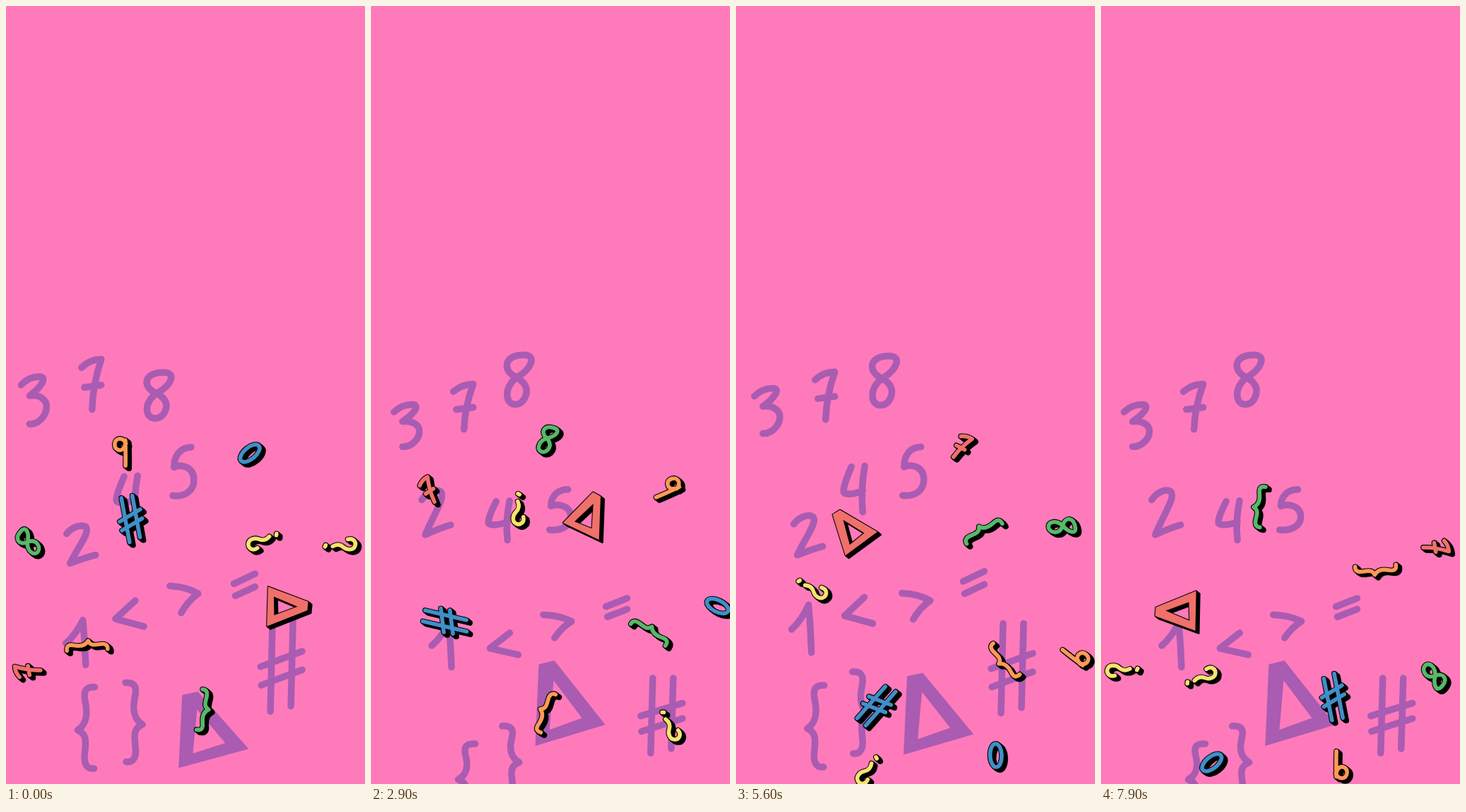
Animation of 508 by 1102 pixels, one loop 8000 ms. Source, as an HTML page with a canvas:

```html
<!DOCTYPE html>
<html>
<head>
<meta charset="utf-8">
<style>
html, body { margin: 0; height: 100%; overflow: hidden; background: #ff7abb; }
canvas { display: block; }
</style>
</head>
<body>
<canvas id="stage" width="508" height="1102"></canvas>
<script>
const ctx = document.getElementById('stage').getContext('2d');
const LOOP = 8000, STEP = 100, SWAY = 5000;
const RAD = Math.PI / 180;

// Centre lines, drawn around the origin
const shapes = {
  '0': 'M4,-30A15,30 8 1 1 -4,30A15,30 8 1 1 4,-30Z',
  '1': 'M-14,1Q0,-11 10,-32Q13,0 14,32',
  '2': 'M-20,-17C-12,-28 0,-32 7,-28C14,-20 -2,0 -15,29Q6,20 21,16',
  '3': 'M-18,-20C-10,-28 0,-31 8,-31C18,-31 14,-20 -6,-6C6,-8 18,-2 18,8C18,22 4,32 -6,31',
  '4': 'M-4,-29C-9,-18 -15,-6 -15,3C-15,8 -2,8 12,2M15,-30Q9,0 12,30',
  '5': 'M12,-32C-4,-32 -12,-20 -12,-6C-2,-10 15,-7 16,9C17,24 4,33 -14,31',
  '7': 'M-14,-22C-6,-29 4,-33 14,-33Q2,0 1,33M-10,4L14,1',
  '8': 'M8,-35C28,-35 18,-16 2,-6C-12,2 -16,14 -15,22C-14,38 8,38 12,18C14,6 4,-1 -4,-5C-22,-14 -20,-35 8,-35Z',
  '9': 'M14,-22C8,-38 -12,-40 -15,-22C-17,-6 0,0 8,-10Q14,-18 13,-30Q12,8 10,36',
  '<': 'M8,-17L-20,7L20,17',
  '>': 'M-20,-17Q4,-16 20,-7Q6,2 -4,18',
  '=': 'M-15,-1L15,-14M-13,15L15,3',
  '#': 'M-12,-59L-15,58M17,-59L14,51M-29,0L30,-20M-28,24L30,4',
  '{': 'M12,-53C-4,-54 -4,-44 -1,-32C2,-18 0,-4 -12,3C0,8 0,16 -2,32C-4,46 0,54 11,53',
  '?': 'M-14,-20C-18,-36 -4,-42 4,-38C16,-33 14,-16 6,-8C-2,0 -4,8 2,20M-2,38l4,2',
  'Δ': 'M-28,-46L-6,-51L66,36L-33,65ZM-7,-24L33,27L-13,43Z'
};

function transformed(path, matrix) {
  const result = new Path2D();
  result.addPath(path, matrix);
  return result;
}

const glyphs = {};
for (const key in shapes) glyphs[key] = new Path2D(shapes[key]);
glyphs['}'] = transformed(glyphs['{'], new DOMMatrix([-1, 0, 0, 1, 0, 0]));
glyphs['¿'] = transformed(glyphs['?'], new DOMMatrix([-1, 0, 0, -1, 0, 0]));

// Resting place, drift, and time of the lowest point
const chalk = [
  ['3', 47, 583, 28, 2050],
  ['7', 128, 559, 28, 1970],
  ['8', 210, 537, 28, 4270],
  ['5', 258, 686, 28, 2820],
  ['4', 175, 709, 27, 3450],
  ['2', 98, 738, 26, 4800],
  ['1', 98, 899, 28, 3900],
  ['<', 181, 880, 24, 3050],
  ['>', 259, 863, 24, 2250],
  ['=', 342, 834, 18, 3050],
  ['#', 400, 971, 36, 2700],
  ['{', 124, 1056, 37, 2880],
  ['}', 188, 1037, 37, 3300],
  ['Δ', 270, 995, 33, 4440]
];

// Two counter-rotating rings of evenly spaced stickers
const palette = ['#f0706a', '#57b968', '#ff9a56', '#3f8fc8', '#f7e36c'];
const rings = [
  { text: '7890?', radius: 238.5, start: 158, gap: 45, speed: 22.85 },
  { text: 'Δ{}#¿', radius: 147, start: -1, gap: 80, speed: -22.85 }
];

function paint(key, path, color, width) {
  const solid = key === 'Δ';
  ctx.fillStyle = ctx.strokeStyle = color;
  ctx.lineWidth = solid ? Math.max(width - 5.6, 0.1) : width;
  if (solid) ctx.fill(path, 'evenodd');
  ctx.stroke(path);
}

function drawChalk([key, x, y, drift, lowest], t) {
  const wave = Math.cos(2 * Math.PI * (t - lowest) / SWAY);
  const sway = wave - 0.1 * (1 - wave * wave);
  const matrix = new DOMMatrix()
    .translate(x + 0.31 * drift * sway, y + drift * sway)
    .scale(1, 1 - 0.095 * sway);
  paint(key, transformed(glyphs[key], matrix), '#a95cb1', key === 'Δ' ? 0 : 9.5);
}

function drawSticker(key, color, radius, angle) {
  const matrix = new DOMMatrix()
    .translate(252 + radius * Math.cos(angle * RAD), 853 + radius * Math.sin(angle * RAD))
    .rotate(angle + 109)
    .scale(0.545);
  const path = transformed(glyphs[key], matrix);
  // Extruded shadow, always towards the lower right
  for (let i = 5; i >= 0; i--) {
    ctx.save();
    ctx.translate(i, i * 0.8);
    paint(key, path, '#000', 7.8);
    ctx.restore();
  }
  paint(key, path, color, 5.6);
}

function drawRing({ text, radius, start, gap, speed }, t) {
  [...text].forEach((key, i) =>
    drawSticker(key, palette[i], radius, start + gap * i + speed * t / 1000));
}

function frame() {
  const t = Math.floor(performance.now() % LOOP / STEP) * STEP;
  ctx.fillStyle = '#ff7abb';
  ctx.fillRect(0, 0, 508, 1102);
  ctx.lineCap = ctx.lineJoin = 'round';
  chalk.forEach(item => drawChalk(item, t));
  rings.forEach(ring => drawRing(ring, t));
  requestAnimationFrame(frame);
}
frame();
</script>
</body>
</html>
```
